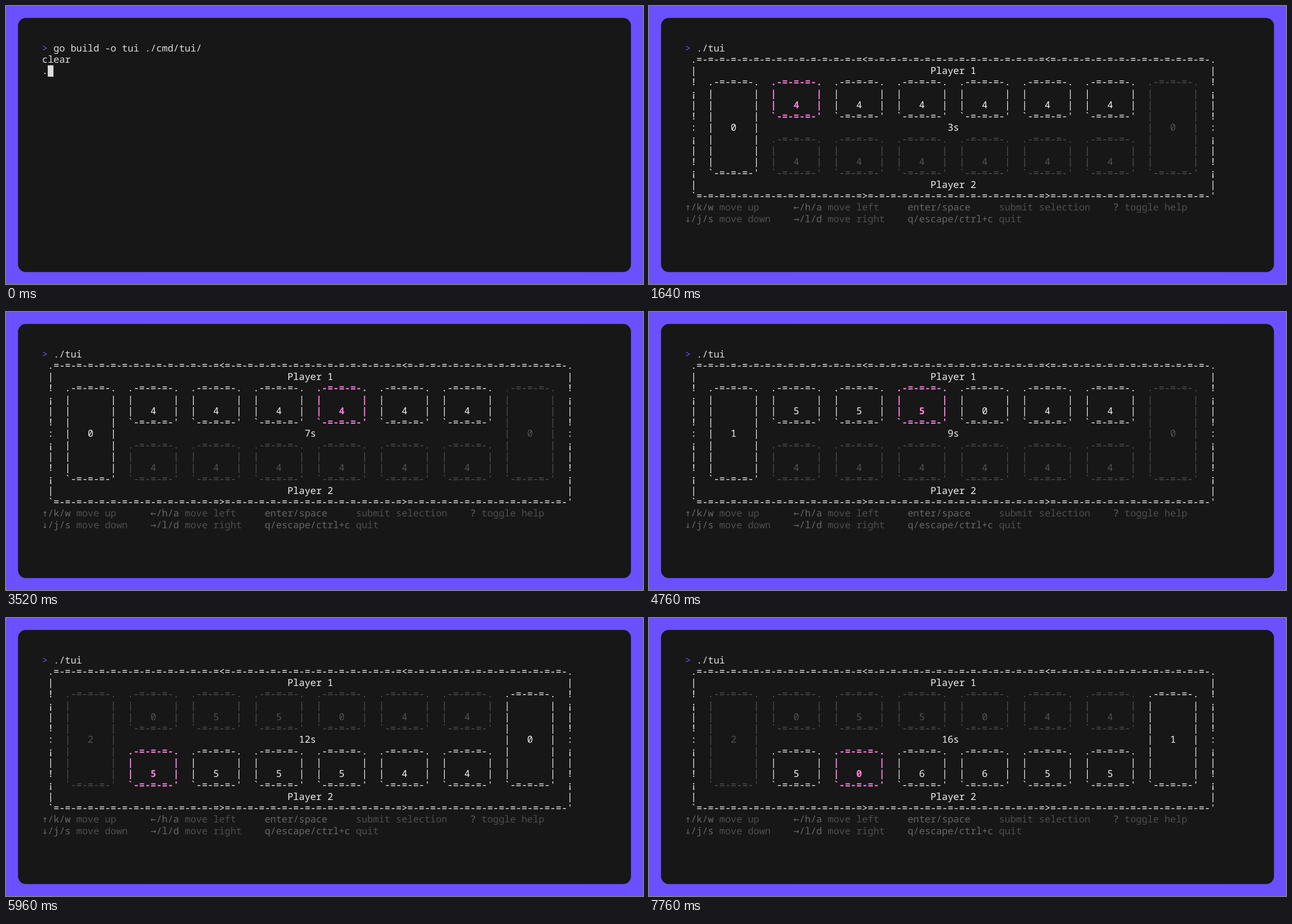
These frames come from a looping animation (1131x495 px, 8 s). An HTML page:

```html
<!DOCTYPE html>
<html lang="en">
<head>
<meta charset="utf-8">
<title>Terminal board game</title>
<style>
  html, body { margin: 0; width: 100%; height: 100%; overflow: hidden; background: #6b50ff; }
  svg { display: block; width: 1131px; height: 495px; }
  text {
    font-family: "Noto Sans Mono", "DejaVu Sans Mono", monospace;
    font-size: 16px;
    font-weight: 500;
    letter-spacing: -0.1px;
    white-space: pre;
    text-rendering: geometricPrecision;
    font-variant-ligatures: none;
  }
  .shell { fill: #ddd; }
  .prompt { fill: #6b50ff; }
  .on { fill: #f2f2f2; }
  .off { fill: #525252; }
  .pick { fill: #ff80df; font-weight: 700; }
  .key { fill: #666; }
  .arrow { fill: #666; font-family: "DejaVu Sans Mono", monospace; }
  .desc { fill: #4e4e4e; }
  .sep { fill: #404040; }
</style>
</head>
<body>
<svg>
  <g transform="scale(1.06667)">
    <rect x="20" y="20" width="1020.3" height="424.1" rx="13" fill="#171717"/>
    <g id="screen"></g>
  </g>
</svg>
<script>
const LOOP = 8000;
const LEFT = 60, TOP = 61, CELL_W = 9.5, CELL_H = 19, BASELINE = 14.5;
const NS = "http://www.w3.org/2000/svg";
const screen = document.getElementById("screen");

// Each entry changes part of the state at its time.
const changes = [
  [0, { view: "build", typed: ".", seconds: 0, help: false, player: 1, pick: 0,
        top: [4, 4, 4, 4, 4, 4], bottom: [4, 4, 4, 4, 4, 4], stores: [0, 0] }],
  [40, { typed: "./" }],
  [80, { typed: "./t" }],
  [120, { typed: "./tu" }],
  [160, { typed: "./tui" }],
  [200, { view: "prompt" }],
  [240, { view: "game" }],
  [1640, { help: true }],
  [2600, { pick: 1 }],
  [2840, { pick: 2 }],
  [3080, { pick: 3 }],
  [3760, { top: [5, 5, 5, 0, 4, 4], stores: [1, 0] }],
  [4760, { pick: 2 }],
  [5000, { pick: 1 }],
  [5240, { pick: 0 }],
  [5920, { player: 2, top: [0, 5, 5, 0, 4, 4], bottom: [5, 5, 5, 5, 4, 4], stores: [2, 0] }],
  [6920, { pick: 1 }],
  [7600, { bottom: [5, 0, 6, 6, 5, 5], stores: [2, 1] }],
];
const ticks = [680, 1160, 1640, 2120, 2560, 3040, 3520, 4000,
               4480, 4960, 5400, 5880, 6360, 6840, 7280, 7760];
ticks.forEach((time, i) => changes.push([time, { seconds: i + 1 }]));
changes.sort((a, b) => a[0] - b[0]);

function add(tag, attrs) {
  const el = document.createElementNS(NS, tag);
  for (const name in attrs) el.setAttribute(name, attrs[name]);
  return screen.appendChild(el);
}

function put(col, row, str, style) {
  add("text", { x: LEFT + col * CELL_W, y: TOP + row * CELL_H + BASELINE, class: style })
    .textContent = str;
}

function cursor(col, row) {
  add("rect", { x: LEFT + col * CELL_W, y: TOP + row * CELL_H,
                width: CELL_W, height: CELL_H, class: "shell" });
}

function command(str) {
  put(0, 0, ">", "prompt");
  put(2, 0, str, "shell");
}

function box(col, row, rows, valueRow, value, style) {
  put(col, row, ".-=-=-=-.", style);
  for (let r = row + 1; r < row + rows - 1; r++) {
    put(col, r, "|", style);
    put(col + 8, r, "|", style);
  }
  put(col, row + rows - 1, "`-=-=-=-'", style);
  put(col + 4, valueRow, String(value), style);
}

function edge(arrow) {
  const part = "=-".repeat(16).slice(0, -1);
  return "=-".repeat(14) + "=" + arrow + part + arrow + "=-".repeat(14);
}

function frame() {
  put(1, 1, "." + edge("<") + ".", "on");
  [..."|!¡|!:¡|!¡|"].forEach((mark, i) => {
    put(1, i + 2, mark, "on");
    put(92, i + 2, mark, "on");
  });
  put(1, 13, "`" + edge(">") + "'", "on");
  put(43, 2, "Player 1", "on");
  put(43, 12, "Player 2", "on");
}

function pits(values, row, active, pick) {
  values.forEach((value, i) => {
    const style = !active ? "off" : i === pick ? "pick" : "on";
    box(15 + i * 11, row, 4, row + 2, value, style);
  });
}

function hint(row, keyCol, key, descCol, desc) {
  put(keyCol, row, key, "key");
  put(descCol, row, desc, "desc");
}

function arrowHint(row, col, arrow, keys, desc) {
  put(col, row, arrow, "arrow");
  hint(row, col + 1, keys, col + 6, desc);
}

function help(full) {
  if (!full) {
    hint(14, 0, "?", 2, "toggle help");
    put(14, 14, "•", "sep");
    hint(14, 16, "q/escape/ctrl+c", 32, "quit");
    return;
  }
  arrowHint(14, 0, "↑", "/k/w", "move up");
  arrowHint(15, 0, "↓", "/j/s", "move down");
  arrowHint(14, 19, "←", "/h/a", "move left");
  arrowHint(15, 19, "→", "/l/d", "move right");
  hint(14, 39, "enter/space", 55, "submit selection");
  hint(15, 39, "q/escape/ctrl+c", 55, "quit");
  hint(14, 75, "?", 77, "toggle help");
}

function render(s) {
  screen.replaceChildren();
  if (s.view === "build") {
    command("go build -o tui ./cmd/tui/");
    put(0, 1, "clear", "shell");
    put(0, 2, s.typed, "shell");
    cursor(s.typed.length, 2);
    return;
  }
  command(s.typed);
  if (s.view === "prompt") {
    cursor(2 + s.typed.length, 0);
    return;
  }
  const first = s.player === 1;
  frame();
  box(4, 3, 9, 7, s.stores[0], first ? "on" : "off");
  box(81, 3, 9, 7, s.stores[1], first ? "off" : "on");
  pits(s.top, 3, first, s.pick);
  pits(s.bottom, 8, !first, s.pick);
  put(s.seconds < 10 ? 46 : 45, 7, s.seconds + "s", "on");
  help(s.help);
}

let shown = -1;
const start = performance.now();

function play(now) {
  const time = Math.max(0, now - start) % LOOP;
  const count = changes.filter(([at]) => at <= time).length;
  if (count !== shown) {
    shown = count;
    render(Object.assign({}, ...changes.slice(0, count).map(([, part]) => part)));
  }
  requestAnimationFrame(play);
}
play(start);
</script>
</body>
</html>
```
